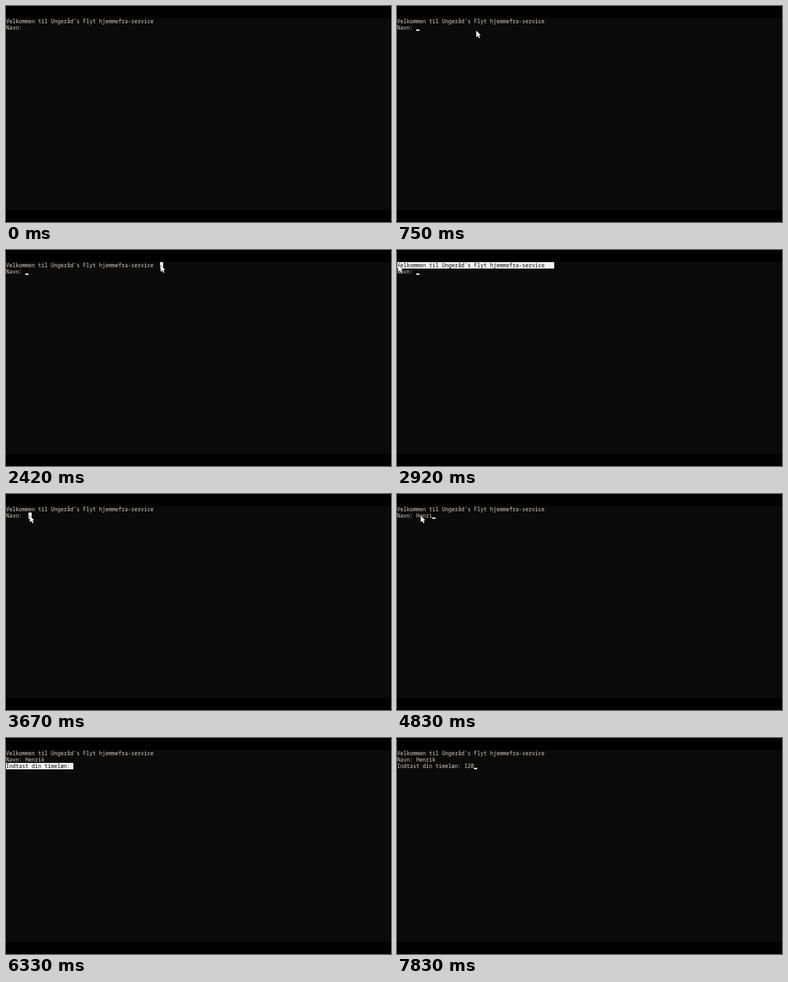
Recreate the animation shown at these times as an HTML page with a canvas. Size 600 px wide and 338 px high, loop 8000 ms.

```html
<!DOCTYPE html>
<html lang="da">
<head>
<meta charset="utf-8">
<title>Konsol</title>
<style>
html, body { margin: 0; width: 100%; height: 100%; overflow: hidden; background: #000; }
canvas { display: block; width: 600px; height: 338px; }
</style>
</head>
<body>
<canvas id="stage" width="600" height="338"></canvas>
<script>
const ctx = document.getElementById("stage").getContext("2d");

const LOOP = 8000;
const CELL_W = 5, CELL_H = 10, TOP = 19;
const BACK = "#0a0a0a", INK = "#d6cfc8", BRIGHT = "#f2f2f2";

const TITLE = "Velkommen til Ungeråd's Flyt hjemmefra-service";
const name = { prompt: "Navn: ", text: "Henrik", start: 4170, gap: 150 };
const wage = { prompt: "Indtast din timeløn: ", text: "120", start: 7170, gap: 205 };
const ENTER = 5000;

// Each move starts where the one before it ended.
const entry = { x: 584, y: 48 };
const moves = [
  { start: 80, end: 750, x: 123.5, y: 38.5 },
  { start: 750, end: 830, x: 82, y: 34 },
  { start: 1000, end: 1400, x: 79, y: 27 },
  { start: 1580, end: 1920, x: 262, y: 29 },
  { start: 1920, end: 2080, x: 241, y: 24 },
  { start: 2420, end: 2920, x: 2, y: 24 },
  { start: 3000, end: 3500, x: 37, y: 34 },
  { start: 5330, end: 5500, x: 72, y: 35 },
  { start: 5750, end: 6000, x: 103, y: 45 },
  { start: 6000, end: 6250, x: 2, y: 44 },
  { start: 6500, end: 6830, x: 115, y: 41 }
];
const pointerShown = [[80, 920], [1500, 6330], [6500, 7830]];
const drags = [[2420, 3000], [3500, 4170], [6000, 6500]];

const during = t => ([from, until]) => t >= from && t < until;
const clamp01 = k => Math.min(1, Math.max(0, k));

function pointerAt(t) {
  let { x, y } = entry;
  for (const move of moves) {
    const k = clamp01((t - move.start) / (move.end - move.start));
    x += (move.x - x) * k;
    y += (move.y - y) * k;
  }
  return { x, y };
}

function cellAt(t) {
  const { x, y } = pointerAt(t);
  return { col: Math.floor(x / CELL_W), row: Math.floor((y - TOP) / CELL_H) };
}

// A drag selects cells of its first row, from its first column to the pointer.
function selectionAt(t) {
  const drag = drags.find(during(t));
  if (!drag) return null;
  const anchor = cellAt(drag[0]), { col } = cellAt(t);
  return { row: anchor.row, first: Math.min(col, anchor.col), last: Math.max(col, anchor.col) };
}

function typed({ prompt, text, start, gap }, t) {
  const count = Math.max(0, Math.floor((t - start) / gap) + 1);
  return prompt + text.slice(0, count);
}

// The caret stays lit while keys are pressed and is hidden in a selected row.
function caretShown(t, row, selection) {
  if (selection) return selection.row !== row;
  const typing = [name, wage].some(({ text, start, gap }) =>
    t >= start && t < start + gap * (text.length + 1));
  return typing || (t + 330) % 500 < 160;
}

function fill(color, x, y, w, h) {
  ctx.fillStyle = color;
  ctx.fillRect(x, y, w, h);
}

function drawText(text, row, color, first = 0, last = text.length - 1) {
  ctx.fillStyle = color;
  for (let col = first; col <= Math.min(last, text.length - 1); col++) {
    ctx.fillText(text[col], col * CELL_W, TOP + row * CELL_H + 7.7);
  }
}

function drawSelection({ row, first, last }, text) {
  fill(BRIGHT, first * CELL_W, TOP + row * CELL_H, (last - first + 1) * CELL_W, CELL_H);
  drawText(text, row, BACK, first, last);
}

function drawPointer({ x, y }) {
  ctx.save();
  ctx.translate(x, y);
  ctx.scale(0.6, 0.6);
  ctx.beginPath();
  [[0, 0], [0, 17], [4, 13.3], [6.8, 19.5], [9.6, 18.3], [7, 12.2], [12, 12]]
    .forEach(([px, py]) => ctx.lineTo(px, py));
  ctx.closePath();
  ctx.lineWidth = 1.5;
  ctx.lineJoin = "round";
  ctx.strokeStyle = "#000";
  ctx.stroke();
  ctx.fillStyle = "#fff";
  ctx.fill();
  ctx.restore();
}

function draw(t) {
  fill("#000", 0, 0, 600, 338);
  fill(BACK, 0, TOP - 0.5, 600, 300.5);
  ctx.font = '8.333px "Noto Sans Mono", "DejaVu Sans Mono", monospace';

  const lines = [TITLE, typed(name, t)];
  if (t >= ENTER) lines.push(typed(wage, t));
  lines.forEach((line, row) => drawText(line, row, INK));

  const selection = selectionAt(t);
  const row = lines.length - 1;
  if (caretShown(t, row, selection)) {
    fill(BRIGHT, lines[row].length * CELL_W, TOP + row * CELL_H + 7.7, CELL_W, 2.2);
  }
  if (selection) drawSelection(selection, lines[selection.row]);
  if (pointerShown.some(during(t))) drawPointer(pointerAt(t));
}

// Twelve pictures a second, on a clock of whole hundredths.
function tick() {
  const step = Math.floor((performance.now() % LOOP + 5) * 12 / 1000);
  draw(Math.round(step * 25 / 3) * 10 % LOOP);
  requestAnimationFrame(tick);
}
tick();
</script>
</body>
</html>
```
